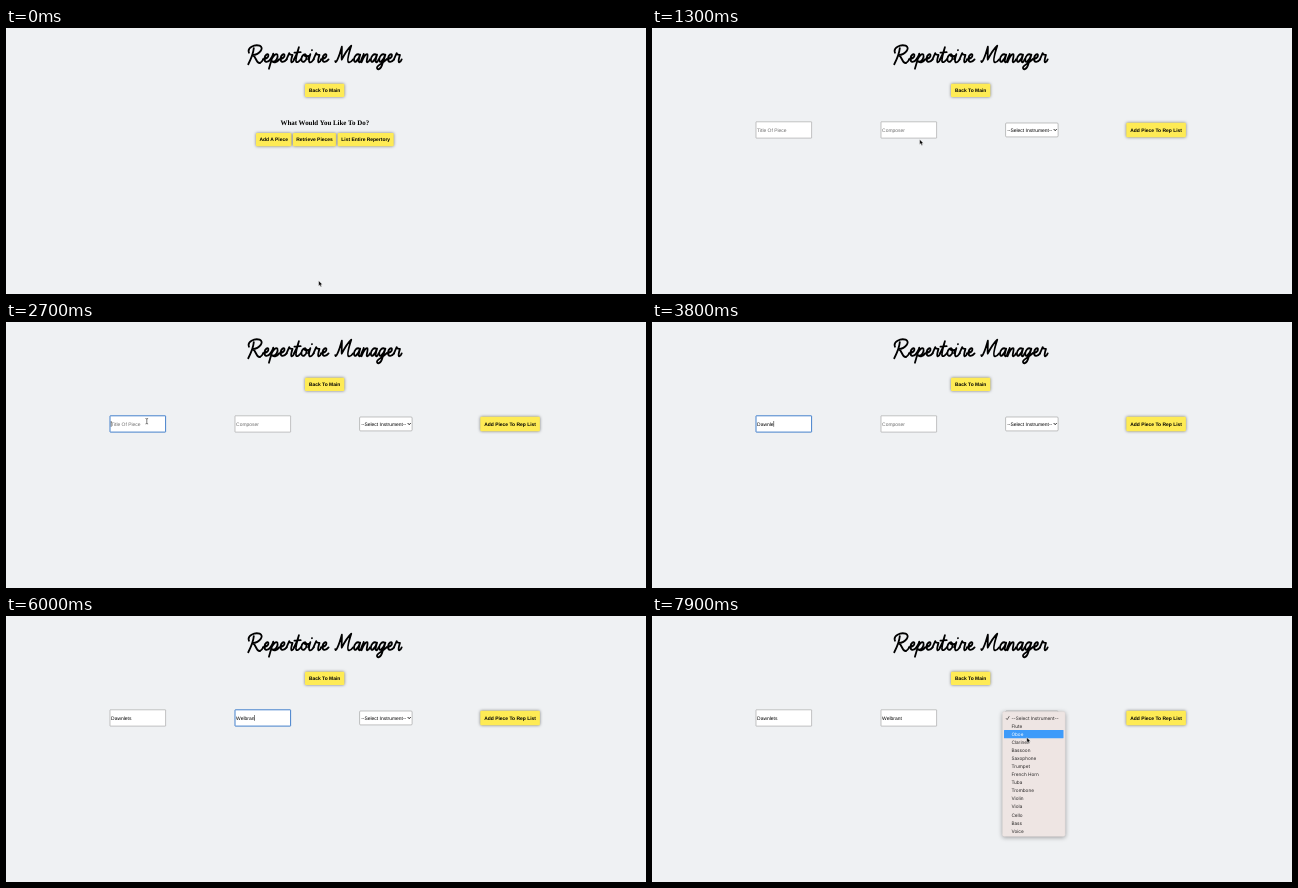
Animation, 640 px wide and 266 px high, one loop 8000 ms. Source, as an HTML page:

```html
<!DOCTYPE html>
<html lang="en">
<head>
<meta charset="utf-8">
<title>Repertoire Manager</title>
<style>
  html, body { margin: 0; width: 100%; height: 100%; overflow: hidden; background: #fafafb; }
  svg { display: block; width: 640px; height: 266px; }
  text { font: 4.94px "Liberation Sans", Arial, sans-serif; text-rendering: geometricPrecision; white-space: pre; }
  .btn rect { fill: #feeb55; filter: drop-shadow(0 .3px 1.5px rgba(0, 0, 0, .5)); }
  .btn text { font-weight: bold; text-anchor: middle; }
  .ask { font: bold 6.93px "Liberation Serif", Times, serif; text-anchor: middle; }
  .field rect { fill: #fff; stroke: #9c9c9c; stroke-width: .6; }
  .field.focus rect { stroke: #4581cc; stroke-width: 1; }
  .field.empty text { fill: #6c6c6c; }
  .caret { stroke: #000; stroke-width: .5; }
  .menu text { font: 4.7px Inter, sans-serif; fill: #262424; }
  .menu text.on { fill: #fff; }
  .panel { fill: #eee5e3; stroke: #cfc8c7; stroke-width: .3; filter: drop-shadow(0 1px 2px rgba(0, 0, 0, .35)); }
  .logo path { fill: none; stroke: #000; stroke-width: 1.85; stroke-linecap: round; stroke-linejoin: round; }
</style>
</head>
<body>
<svg id="stage" viewBox="0 0 640 266">
  <rect width="640" height="266" rx="2.5" fill="#eff1f3"/>
  <g class="logo" id="logo" role="img" aria-label="Repertoire Manager"></g>
  <g id="home"><text class="ask" x="318.8" y="96.7">What Would You Like To Do?</text></g>
  <g id="form"></g>
  <g id="menu" class="menu"></g>
  <path id="arrow" d="M0 0V5.2L1.2 4.1L2 6L2.9 5.6L2.1 3.8H3.7Z" fill="#000" stroke="#fff" stroke-width=".35"/>
  <path id="beam" d="M-1.3-2.7Q0-2.7 0-2Q0-2.7 1.3-2.7M0-2V2M-1.3 2.7Q0 2.7 0 2Q0 2.7 1.3 2.7" fill="none" stroke="#222" stroke-width=".6"/>
</svg>
<script>
const LOOP = 8000, ROW = 8.07, MENU_TOP = 98;
const $ = id => document.getElementById(id);

function add(parent, tag, attrs, text) {
  const el = document.createElementNS('http://www.w3.org/2000/svg', tag);
  for (const k in attrs) el.setAttribute(k, attrs[k]);
  if (text) el.textContent = text;
  return parent.appendChild(el);
}

// Script lettering: advance and pen strokes, baseline at y = 0
const glyphs = {
  R: [16, 'M6.500-14C6-9 3.500-3 .8 2M1.500-9.500C-.5-14.500 7-18 12.500-16.500C17.500-14.500 13-8 5-7C8.500-7 8.500 .3 12 .8C14 1 15.300-1 16.300-3'],
  e: [7.6, 'M0-2.800C3-3.200 6-5 5.600-7.200C5-9 2-7.500 1.500-4C1.200 .8 5 .6 7.800-2.800'],
  p: [9, 'M0-3C1.500-5 2.600-7 3-8.500L-1.500 6.500M1.300-3C3-6.500 5.800-9.200 7.200-7.600C8.200-5.300 6 .3 2-.7C4 1 7 0 9-2.800'],
  r: [7.8, 'M0-2.800L2.800-9C3.200-7.200 4.800-7.400 6.200-7.300C5.300-4.500 4 0 5.600 0C6.600 0 7.400-1.300 8-2.800'],
  t: [6.8, 'M0-3C2-6 4-11 5-15C3.300-9.500 1.200-2 2.200-.5C3.200 .8 5.500-1 7-3M.4-9.600L6.800-10'],
  o: [7.6, 'M4.600-8C2-8 0-4 1-1.500C2.200 1 6-1 6-4.800C6-7.500 4.500-8.400 3.800-7.200C4-5.600 6-5.600 8-6.200'],
  i: [5.6, 'M0-3L2.400-8C1.400-5 .5-1 1.500 0C2.500 .7 4.500-1 6-3M4-12L4.100-12.100'],
  M: [20, 'M1.500-1C2 2 5-4 8.300-15.500C8.500-10 7.800-5 8.200-2.500C11-8 14.500-13.500 18-16.500C15.500-9 13.500-1 15.200 0C16.800 .7 18.500-1 20-3'],
  a: [8.6, 'M6.800-7.200C4-9.600 .5-5.500 .8-2C1 1 4.500 0 7.200-7.600C6-4 5 0 6.500 0C7.700 0 8.300-1.500 8.800-3'],
  n: [8.8, 'M0-3L2.300-8.200C1.700-6 .8-3 0 0C2-5 4.500-8.800 6-8C7.300-7 4 0 6 0C7.300 0 8-1.500 8.800-3'],
  g: [8.4, 'M6.800-7.200C4-9.600 .5-5.500 .8-2C1 1 4.500 0 7.200-7.600L3.500 3.500C1.500 8.500-2 7.500-1.400 5C-.6 2.500 5 1 8.600-3']
};
function letter(word, x) {
  for (const c of word) {
    const [adv, d] = glyphs[c];
    add($('logo'), 'path', { d, transform: `translate(${x} 34.200) scale(.97 1)` });
    x += adv * .97;
  }
}
letter('Repertoire', 241.5);
letter('Manager', 327.8);

function button(parent, x, y, w, h, label) {
  const g = add(parent, 'g', { class: 'btn' });
  add(g, 'rect', { x, y, width: w, height: h, rx: 1 });
  add(g, 'text', { x: x + w / 2, y: y + h / 2 + 1.75 }, label);
}
button($('stage').insertBefore(add($('stage'), 'g', {}), $('home')), 299, 55.8, 39.3, 13.3, 'Back To Main');
button($('home'), 250, 105, 35.4, 13.2, 'Add A Piece');
button($('home'), 287, 105, 43, 13.2, 'Retrieve Pieces');
button($('home'), 331.7, 105, 56, 13.2, 'List Entire Repertory');
button($('form'), 474.3, 94.8, 59.6, 14.4, 'Add Piece To Rep List');

function field(x, hint, value, focus, blur, start, step) {
  const g = add($('form'), 'g', { class: 'field' });
  add(g, 'rect', { x: x + .4, y: 93.8, width: 55.6, height: 16.3, rx: .3 });
  const text = add(g, 'text', { x: x + 1.5, y: 103.75 });
  const caret = add(g, 'path', { class: 'caret' });
  return { x, hint, value, focus, blur, start, step, g, text, caret };
}
const fields = [
  field(103.6, 'Title Of Piece', 'Dawnlets', 2300, 4500, 3200, 120),
  field(228.6, 'Composer', 'Welbrant', 4500, 7300, 5000, 155)
];

const select = add($('form'), 'g', {});
add(select, 'rect', { x: 353.6, y: 95, width: 52.5, height: 13.9, rx: 1, fill: '#fff', stroke: '#858585', 'stroke-width': .5 });
add(select, 'text', { x: 355.2, y: 103.75 }, '--Select Instrument--');
add(select, 'path', { d: 'M401.800 101.200L403.200 102.600L404.600 101.200', fill: 'none', stroke: '#000', 'stroke-width': 1 });

add($('menu'), 'rect', { class: 'panel', x: 350.3, y: 95.6, width: 63, height: 125, rx: 2 });
const bar = add($('menu'), 'rect', { x: 352, width: 59.5, height: 8.1, rx: .5, fill: '#3e9bfa' });
add($('menu'), 'path', { d: 'M354 102.200L355.200 103.600L357.300 100.200', fill: 'none', stroke: '#262424', 'stroke-width': .65 });
const items = ['--Select Instrument--', 'Flute', 'Oboe', 'Clarinet', 'Bassoon', 'Saxophone', 'Trumpet', 'French Horn',
  'Tuba', 'Trombone', 'Violin', 'Viola', 'Cello', 'Bass', 'Voice'
].map((name, i) => add($('menu'), 'text', { x: 359.4, y: 103.7 + i * ROW }, name));

// Pointer stops: time, x, y
const stops = [
  [0, 312.7, 252.8], [100, 312.7, 252.8], [900, 265, 111], [1050, 265, 111], [1300, 267.7, 111.4], [1400, 267.7, 111.4],
  [2050, 140.8, 99.2], [6400, 140.8, 99.2], [7150, 368.8, 107], [7450, 368.8, 107], [7850, 374.8, 121.4], [LOOP, 374.8, 121.4]
];
function pointer(t) {
  const i = stops.findIndex(s => s[0] > t);
  const [t0, x0, y0] = stops[i - 1], [t1, x1, y1] = stops[i];
  const u = (t - t0) / (t1 - t0), e = u * u * (3 - 2 * u);
  return [x0 + (x1 - x0) * e, y0 + (y1 - y0) * e];
}

const show = (el, on) => el.setAttribute('visibility', on ? 'visible' : 'hidden');

function drawField(f, t) {
  const n = Math.max(0, Math.min(f.value.length, Math.floor((t - f.start) / f.step) + 1));
  const focused = t >= f.focus && t < f.blur;
  const last = n ? f.start + (n - 1) * f.step : f.focus;
  f.text.textContent = n ? f.value.slice(0, n) : f.hint;
  f.g.setAttribute('class', 'field' + (n ? '' : ' empty') + (focused ? ' focus' : ''));
  const cx = f.x + 1.6 + (n ? f.text.getComputedTextLength() : 0);
  f.caret.setAttribute('d', `M${cx} 99V104.800`);
  f.caret.style.display = focused && (t - last) % 1000 < 500 ? '' : 'none';
}

function draw(now) {
  const t = now % LOOP, onForm = t >= 950, open = t >= 7300;
  const [x, y] = pointer(t);
  $('home').style.display = onForm ? 'none' : '';
  $('form').style.display = onForm ? '' : 'none';
  $('menu').style.display = open ? '' : 'none';
  if (onForm) fields.forEach(f => drawField(f, t));

  const row = Math.floor((y - MENU_TOP) / ROW);
  bar.setAttribute('y', MENU_TOP - .1 + row * ROW);
  items.forEach((el, i) => el.setAttribute('class', i === row ? 'on' : ''));

  const typing = t >= 3200 && t < 6400;
  const overField = onForm && y > 93.4 && y < 110.5 && fields.some(f => x > f.x && x < f.x + 56.4);
  show($('arrow'), !typing && !overField);
  show($('beam'), !typing && overField);
  for (const id of ['arrow', 'beam']) $(id).setAttribute('transform', `translate(${x} ${y})`);
}

const begin = performance.now();
function tick() {
  draw(performance.now() - begin);
  requestAnimationFrame(tick);
}
tick();
</script>
</body>
</html>
```
